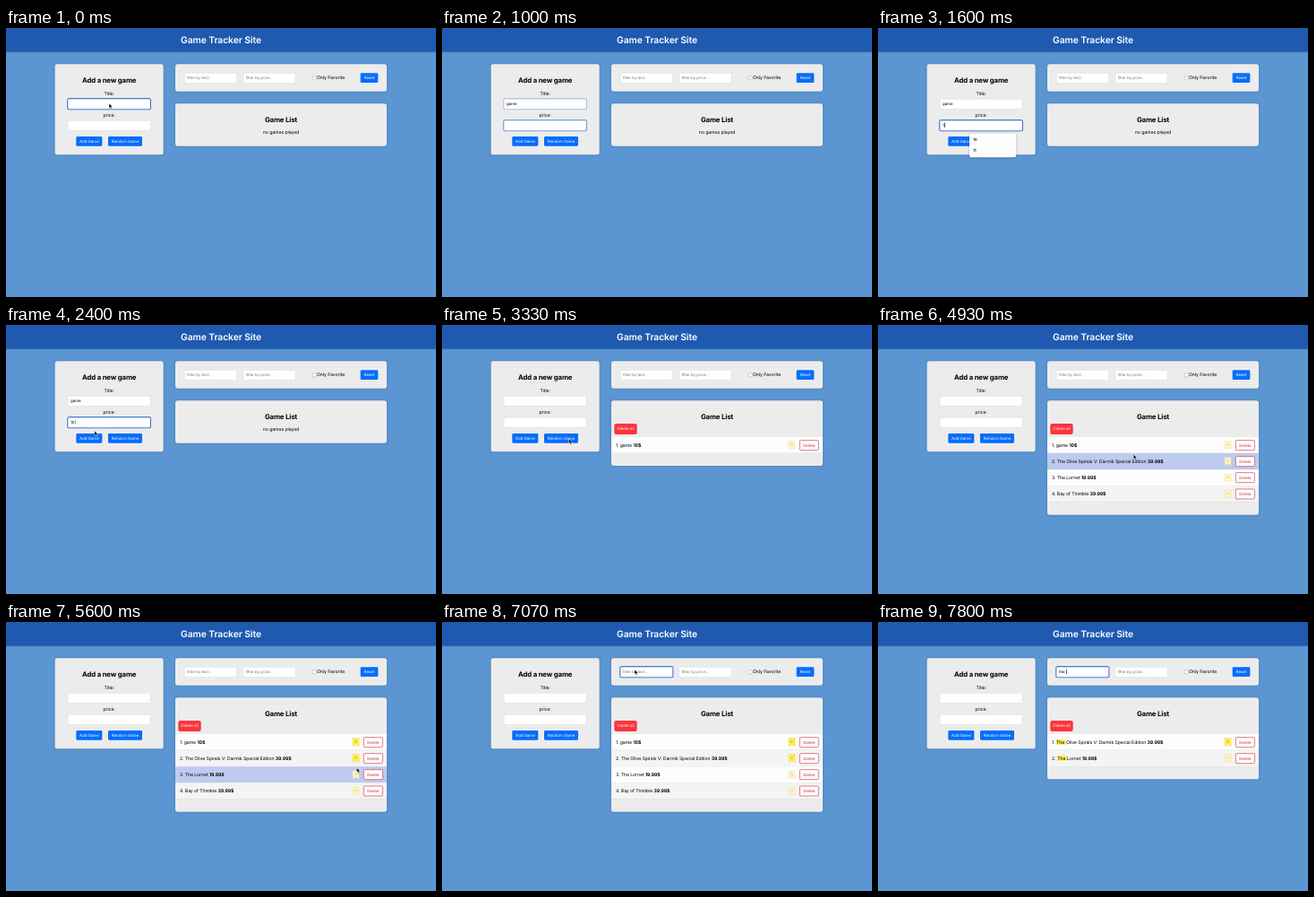
An HTML page that plays this animation: 480 px wide and 300 px high, repeating every 8 s.

```html
<!DOCTYPE html>
<html lang="en">
<head>
<meta charset="utf-8">
<title>Game Tracker Site</title>
<style>
  html, body { margin: 0; width: 100%; height: 100%; overflow: hidden; background: #5b96d2; }
  #stage {
    position: absolute; left: 0; top: 0; width: 1440px; height: 900px;
    transform: scale(.333333); transform-origin: 0 0; overflow: hidden;
    font: 15.45px Inter, "Liberation Sans", sans-serif; letter-spacing: -.015em;
    color: #000; background: #5b96d2; text-rendering: geometricPrecision;
  }
  #stage * { box-sizing: border-box; }
  header, section, h2, p, .btn, .field, .row, #popup, #cursor, #check { position: absolute; margin: 0; }
  header {
    left: 0; top: 0; width: 1440px; height: 80px; line-height: 83px; text-align: center;
    font-size: 30.9px; font-weight: 600; color: #fff; background: #1f5ab0;
    box-shadow: 0 1px 4px rgba(0, 0, 0, .2);
  }
  section { background: #ececec; border-radius: 8px; box-shadow: 0 0 8px rgba(0, 0, 0, .22); }
  #form { left: 164px; top: 121px; width: 363px; height: 303px; }
  #filters { left: 567px; top: 121px; width: 708px; height: 91px; }
  #games { left: 567px; top: 253px; width: 708px; }
  h2, p { left: 0; width: 100%; height: 30px; line-height: 30px; text-align: center; }
  h2 { font-size: 23.25px; font-weight: 700; letter-spacing: -.02em; }
  .btn {
    height: 32px; line-height: 32px; border-radius: 4px; text-align: center;
    font-size: 13.3px; letter-spacing: -.005em; color: #fff; background: #056dfc;
  }
  .field {
    height: 35px; line-height: 32px; padding: 0 8px; border: 1.5px solid #c9c9c9; border-radius: 4px;
    background: #fff; font-size: 13.3px; letter-spacing: -.005em; white-space: pre;
  }
  .field i { font-style: normal; font-size: 13px; color: #777; }
  .caret { display: inline-block; width: 1.5px; height: 16px; margin-left: 1px; vertical-align: -3px; background: #111; }
  #check { left: 459px; top: 40px; width: 13px; height: 13px; border: 1.3px solid #767676; border-radius: 2.5px; background: #fff; }
  .row {
    left: 0; width: 708px; height: 54.4px; line-height: 54px; padding-left: 15px;
    border-bottom: 1.5px solid #d2d2d2; background: #fdfdfd; white-space: pre;
  }
  .row:nth-child(even) { background: #f4f4f4; }
  .row.over { background: #bccbee; }
  .row svg { position: absolute; left: 592px; top: 12px; }
  .row .btn { left: 630px; top: 9.5px; width: 65px; height: 35px; border: 2px solid #d23a48; background: #fff; color: #c9283a; }
  #list { position: absolute; left: 0; top: 122px; }
  mark { background: #ffee62; color: inherit; padding: 0 1px; border-radius: 2px; }
  #wipe { left: 10px; top: 77px; width: 76px; height: 36px; line-height: 36px; border-radius: 6px; background: #fb343c; }
  #popup {
    left: 306px; top: 353px; width: 157px; padding: 4px 0; border-radius: 7px; background: #fdfdfd;
    box-shadow: 0 2px 9px rgba(0, 0, 0, .28); font-size: 13.3px; font-weight: 500;
  }
  #popup div { height: 36px; line-height: 36px; padding-left: 12px; }
  #cursor { left: 0; top: 0; }
</style>
</head>
<body>
<div id="stage">
  <header>Game Tracker Site</header>
  <section id="form">
    <h2 style="top:39px">Add a new game</h2>
    <p style="top:83px">Title:</p>
    <div class="field" id="title" style="left:43px;top:116px;width:277px"></div>
    <p style="top:155px">price:</p>
    <div class="field" id="price" style="left:43px;top:188px;width:277px"></div>
    <div class="btn" id="add" style="left:71px;top:242px;width:87px">Add Game</div>
    <div class="btn" id="random" style="left:178px;top:242px;width:114px">Random Game</div>
  </section>
  <section id="filters">
    <div class="field" id="query" style="left:30px;top:29px;width:176px"></div>
    <div class="field" style="left:227px;top:29px;width:176px"><i>filter by price...</i></div>
    <div id="check"></div>
    <p style="left:474px;top:31px;text-align:left">Only Favorite</p>
    <div class="btn" style="left:620px;top:30px;width:59px">Reset</div>
  </section>
  <section id="games">
    <h2 style="top:39px">Game List</h2>
    <p id="empty" style="top:82px">no games played</p>
    <div class="btn" id="wipe">Delete all</div>
    <div id="list"></div>
  </section>
  <div id="popup"></div>
  <svg id="cursor" width="20" height="28" viewBox="-2 -2 20 28">
    <path d="M0 0V16.5L3.8 13L6.6 19.4L9.6 18.1L6.9 11.9H12Z" fill="#000" stroke="#fff" stroke-width="1.5"/>
  </svg>
</div>
<script>
const LOOP = 8000, ROW = 54.4;
const $ = id => document.getElementById(id);

// [time, value] steps
const TITLE = [[0, ''], [330, 'g'], [400, 'ga'], [530, 'gam'], [600, 'game'], [2730, '']];
const PRICE = [[0, ''], [1330, '1'], [1670, '10'], [2730, '']];
const QUERY = [[0, ''], [7400, 't'], [7530, 'th'], [7670, 'the'], [7800, 'the ']];
const HINTS = [[0, ''], [1400, '10 11'], [1670, '10'], [1800, '']];

const GAMES = [
  { name: 'game', cost: '10', added: 2730, starred: 5270 },
  { name: 'The Olive Spirals V: Darmik Special Edition', cost: '39.99', added: 3670, starred: 5470 },
  { name: 'The Lornet', cost: '19.99', added: 3870 },
  { name: 'Bay of Thimble', cost: '39.99', added: 4130 }
];

// [time, x, y] of the pointer tip
const PATH = [
  [0, 115, 84], [2070, 115, 84], [2530, 95, 126], [2930, 95, 126], [3330, 141.5, 127],
  [3530, 137, 129], [4470, 137, 129], [4800, 250, 148], [5200, 390, 133], [5330, 390, 133],
  [5470, 390.5, 150], [5600, 391.5, 162.5], [5700, 386, 170], [5870, 300, 115],
  [6070, 222, 57], [6600, 222, 57], [6870, 215, 53], [LOOP, 215, 53]
];

const step = (steps, t) => steps.filter(s => s[0] <= t).pop()[1];
const clamp = v => Math.max(0, Math.min(1, v));
const pulse = (t, on, off, fade = 200) => clamp((t - on) / fade) - clamp((t - off) / fade);
const mix = (a, b, k) => `rgb(${a.map((v, i) => Math.round(v + (b[i] - v) * k))})`;

function pointer(t) {
  const i = Math.max(1, PATH.findIndex(p => p[0] > t));
  const [t0, x0, y0] = PATH[i - 1], [t1, x1, y1] = PATH[i];
  const u = (t - t0) / (t1 - t0), k = u * u * (3 - 2 * u);
  return { x: x0 + (x1 - x0) * k, y: y0 + (y1 - y0) * k, shown: t < 330 || (t >= 2070 && t < 7400) };
}

const cache = {};
function fill(id, html) {
  if (cache[id] !== html) $(id).innerHTML = cache[id] = html;
}

function field(id, text, hint, ring, focused) {
  const caret = focused && text ? '<span class="caret"></span>' : '';
  fill(id, text ? text + caret : hint && `<i>${hint}</i>`);
  const s = $(id).style;
  s.borderColor = mix([201, 201, 201], [31, 91, 184], ring);
  s.boxShadow = `0 0 0 2px rgba(38,100,198,${ring})`;
}

function button(id, k) {
  $(id).style.background = mix([5, 109, 252], [18, 77, 166], k);
}

function bookmark(on) {
  const [body, edge, star] = on ? ['#fff04c', '#f0dc48', '#d9bf2c'] : ['#fbf6d2', '#f1e48c', '#eedd7c'];
  return `<svg width="25" height="30" viewBox="0 0 25 30">
    <path d="M2 2H23V28L12.5 24L2 28Z" fill="${body}" stroke="${edge}" stroke-width="2"/>
    <path d="M12.5 7L14 11H18L15 13.7L16 18L12.5 15.6L9 18L10 13.7L7 11H11Z" fill="${star}"/></svg>`;
}

function list(t, p) {
  const q = step(QUERY, t);
  const rows = GAMES.filter(g => t >= g.added && g.name.toLowerCase().includes(q));
  const inside = p.shown && p.x > 189 && p.x < 425;
  const over = inside ? Math.floor((p.y * 3 - 375) / ROW) : -1;
  fill('list', rows.map((g, i) => {
    const name = q ? g.name.replace(new RegExp(q, 'gi'), '<mark>$&</mark>') : g.name;
    return `<div class="row${i === over ? ' over' : ''}" style="top:${i * ROW}px">` +
      `${i + 1}. ${name} <b>${g.cost}$</b>${bookmark(t >= g.starred)}<span class="btn">Delete</span></div>`;
  }).join(''));
  const n = rows.length;
  $('games').style.height = (n ? 164 + n * ROW : 142) + 'px';
  $('empty').style.display = n ? 'none' : '';
  $('wipe').style.display = n ? '' : 'none';
}

function draw(t) {
  const p = pointer(t);
  field('title', step(TITLE, t), '', 1 - clamp((t - 870) / 200), t < 870);
  field('price', step(PRICE, t), '', pulse(t, 870, 2670), t >= 870 && t < 2670);
  field('query', step(QUERY, t), 'filter by text...', pulse(t, 6800, LOOP), t >= 6800);
  button('add', pulse(t, 2450, 3000));
  button('random', pulse(t, 3360, 4500));
  list(t, p);

  const hints = step(HINTS, t);
  fill('popup', hints.split(' ').map(h => `<div>${h}</div>`).join(''));
  $('popup').style.display = hints ? '' : 'none';
  $('popup').style.opacity = 1 - clamp((t - 1730) / 70);

  $('cursor').style.display = p.shown ? '' : 'none';
  $('cursor').style.transform = `translate(${p.x * 3 - 2}px,${p.y * 3 - 2}px)`;
}

function tick() {
  draw(performance.now() % LOOP);
  requestAnimationFrame(tick);
}
tick();
</script>
</body>
</html>
```
